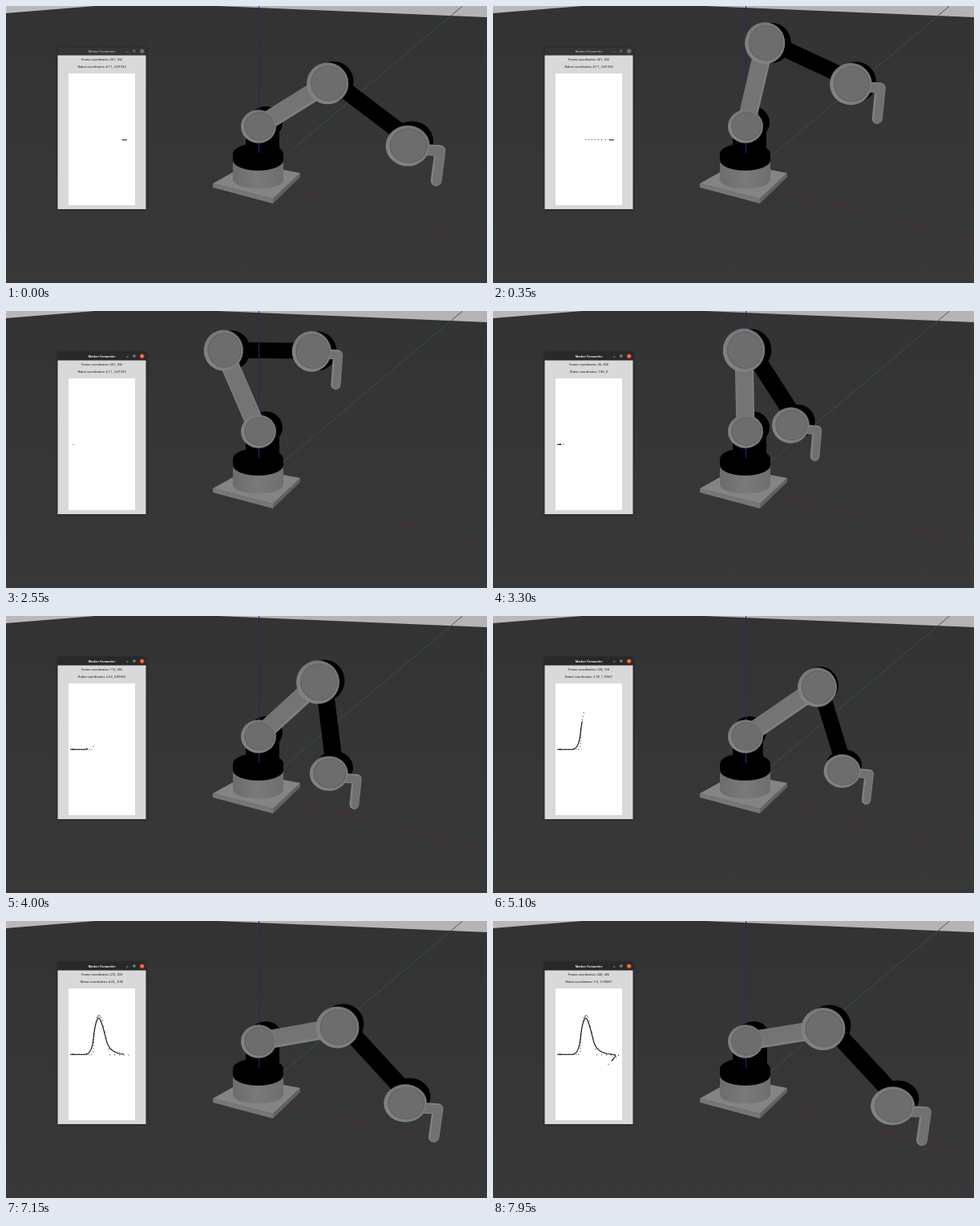
An HTML page with a canvas that plays this animation: 600x345 px, repeating every 8 s.

```html
<!DOCTYPE html>
<html lang="en">
<head>
<meta charset="utf-8">
<title>Robot arm</title>
<style>
html, body { margin: 0; width: 100%; height: 100%; overflow: hidden; background: #373737; }
canvas { display: block; width: 100%; height: 100%; }
</style>
</head>
<body>
<canvas id="stage"></canvas>
<script>
const W = 600, H = 345, LOOP = 8000, STEP = 50;
const SWEEP_END = 1650, FOCUS = 2550, FALL = 1200, LAG = 300;
const SHOULDER = [315, 150];
const canvas = document.getElementById('stage');
const ctx = canvas.getContext('2d');
const ratio = window.devicePixelRatio || 1;
canvas.width = W * ratio;
canvas.height = H * ratio;

// Pointer path in the pad: time, x, y
const CURSOR = [
  [2600, 9, 300], [3200, 25, 300], [3900, 105, 300], [4000, 112, 286],
  [4800, 118, 180], [5100, 128, 134], [5450, 139, 121], [5650, 150, 134],
  [6300, 188, 302], [7250, 288, 303], [7600, 270, 315], [7900, 240, 346]
];
const PAD_START = [244, 301], PAD_REST = [22, 300];

const clamp01 = v => Math.min(Math.max(v, 0), 1);
const mix = (a, b, u) => a + (b - a) * u;
const mixPoint = (p, q, u) => [mix(p[0], q[0], u), mix(p[1], q[1], u)];

function cursorAt(t) {
  const i = Math.max(1, CURSOR.findIndex(k => k[0] >= t));
  const b = t >= CURSOR.at(-1)[0] ? CURSOR.at(-1) : CURSOR[i];
  const a = CURSOR[CURSOR.indexOf(b) - 1];
  return mixPoint(a.slice(1), b.slice(1), clamp01((t - a[0]) / (b[0] - a[0])));
}

// The arm chases the pointer with a short lag
const chase = [PAD_REST];
for (let t = FOCUS + STEP; t <= LOOP; t += STEP) {
  chase.push(mixPoint(chase.at(-1), cursorAt(t), 1 - Math.exp(-STEP / LAG)));
}

const sweepLeft = t => 1 - clamp01(t / SWEEP_END);

function tipAt(t) {
  if (t >= FOCUS) return chase[Math.floor((t - FOCUS) / STEP)];
  return mixPoint(PAD_REST, PAD_START, sweepLeft(t) ** 2.7);
}

function liftAt(t) {
  if (t < FOCUS) return 134 - 82 * sweepLeft(t) ** 5;
  const u = clamp01((t - FOCUS) / FALL);
  return 134 * (1 - u * u * (3 - 2 * u));
}

const toRobot = ([x, y]) => [1.5 + x / 100, (300 - y) / 150];
const toPad = ([x, y]) => [78 + x * 0.275, 84 + y * 0.274];

// Place the wrist from robot coordinates, then solve the elbow
function solveArm(t) {
  const [x, y] = toRobot(tipAt(t)), lift = liftAt(t);
  const wrist = [264.5 + 58.5 * x + 15 * y + lift * 0.12, 152 + 18.8 * x - 11.6 * y - lift];
  const upper = 100 + 10 * (lift / 134) ** 2 + 10 * y;
  const fore = 97 + 7.5 * x - 10 * y;
  const dx = wrist[0] - SHOULDER[0], dy = wrist[1] - SHOULDER[1], d = Math.hypot(dx, dy);
  const bend = Math.acos((upper ** 2 + d ** 2 - fore ** 2) / (2 * upper * d));
  const angle = Math.atan2(dy, dx) - bend;
  const corner = [wrist[0] + 27 + 3.4 * x - 3 * y, wrist[1] + 7 - lift * 0.02 - 4 * y];
  return {
    wrist, corner,
    elbow: [SHOULDER[0] + Math.cos(angle) * upper, SHOULDER[1] + Math.sin(angle) * upper],
    tip: [corner[0] - 1 - x, corner[1] + 27 + 2 * x + lift * 0.05],
    depth: 9 - 5 * y,
    elbowR: 27 - lift * 0.018 - 3 * y,
    wristR: 19.8 + 1.8 * x - 2 * y + lift * 0.012
  };
}

function poly(points, fill) {
  ctx.beginPath();
  points.forEach(p => ctx.lineTo(...p));
  ctx.fillStyle = fill;
  ctx.fill();
}

function line(points, color, width, cap = 'butt') {
  ctx.beginPath();
  points.forEach(p => ctx.lineTo(...p));
  ctx.strokeStyle = color;
  ctx.lineWidth = width;
  ctx.lineCap = cap;
  ctx.lineJoin = 'round';
  ctx.stroke();
}

// Discs look flatter the lower they stand
function disc([x, y], r, fill, squash = 1.08 - y * 0.0009) {
  ctx.beginPath();
  ctx.ellipse(x, y, r, r * squash, 0, 0, Math.PI * 2);
  ctx.fillStyle = fill;
  ctx.fill();
}

function box(x, y, w, h, fill) {
  ctx.fillStyle = fill;
  ctx.fillRect(x, y, w, h);
}

function shade(x0, y0, x1, y1, ...colors) {
  const g = ctx.createLinearGradient(x0, y0, x1, y1);
  colors.forEach((c, i) => g.addColorStop(i / (colors.length - 1), c));
  return g;
}

function text(str, y, size, color, weight = 400) {
  ctx.font = `${weight} ${size}px "Noto Sans", sans-serif`;
  ctx.textAlign = 'center';
  ctx.fillStyle = color;
  ctx.fillText(str, 119.5, y);
}

function cylinder(x, top, bottom, rx, ry, fill) {
  ctx.beginPath();
  ctx.ellipse(x, top, rx, ry, 0, Math.PI, 0);
  ctx.ellipse(x, bottom, rx, ry, 0, 0, Math.PI);
  ctx.fillStyle = fill;
  ctx.fill();
}

function drawWorld() {
  box(0, 0, W, H, shade(0, 0, 0, H, '#333', '#363636', '#383838'));
  poly([[0, 0], [111, 0], [0, 9]], '#b9b9b9');
  poly([[264, 0], [W, 0], [W, 14]], '#b4b4b4');
  line([[569.5, 0], [340, 193]], '#2b602b', 0.9);
  line([[340, 225], [W, 291.5]], '#5c2727', 0.8);
}

function drawBase() {
  poly([[258, 221], [333, 240], [333, 246], [258, 226]], '#777');
  poly([[333, 240], [367, 208], [367, 213], [333, 246]], '#626262');
  poly([[258, 221], [303, 196], [367, 208], [333, 240]], '#848484');
  cylinder(314.5, 192, 216, 31.5, 11.5, shade(283, 0, 346, 0, '#6c6c6c', '#7a7a7a', '#6e6e6e'));
  cylinder(314.5, 184, 192, 31.5, 13, '#000');
}

function joint([x, y], r) {
  disc([x, y], r, shade(x - r, y + r, x + r, y - r, '#868686', '#7a7a7a', '#747474'));
  disc([x + 1, y], r * 0.85, '#616161');
  disc([x + 1.2, y], r * 0.81, '#6d6d6d');
}

function drawArm(t) {
  const { elbow, wrist, corner, tip, depth, elbowR, wristR } = solveArm(t);
  const behind = ([x, y]) => [x + depth - (x - 315) * 0.02, y - (y - 40) / 22];
  const [backShoulder, backElbow, backWrist] = [SHOULDER, elbow, wrist].map(behind);

  box(299, 150, backShoulder[0] - 282, 34, '#000');
  disc(backShoulder, 21, '#000');
  disc(backElbow, elbowR - 1, '#000');
  line([backElbow, backWrist], '#000', elbowR * 0.8);
  disc(backWrist, wristR - 1, '#000');
  line([[315.5, 0], [315.5, 183]], '#24247a', 1);

  const tool = [[wrist[0] + 14, corner[1] - 1.5], corner, tip];
  line(tool, '#818181', wristR * 0.5, 'round');
  line(tool.map(([x, y]) => [x + 0.8, y + 0.6]), '#717171', wristR * 0.5 - 3, 'round');
  line([SHOULDER, elbow], '#7f7f7f', 23);
  line([SHOULDER, elbow].map(([x, y]) => [x - 0.5, y - 1.5]), '#747474', 20);
  joint(SHOULDER, 22);
  joint(elbow, elbowR);
  joint(wrist, wristR);
}

const dot = ([x, y]) => box(x - 0.5, y - 0.5, 1, 1, '#222');

function drawTrail(t) {
  if (t < FOCUS) {
    line([[145, 166.8], [151, 166.8]], '#222', 1.1);
    for (let s = 0; s <= Math.min(t, SWEEP_END); s += STEP) dot(toPad(tipAt(s)));
    return;
  }
  dot(toPad(PAD_REST));
  const path = chase.slice(1, (t - FOCUS) / STEP + 1);
  line(path.map(toPad), '#111', 1.15, 'round');
  for (let s = FOCUS + STEP; s <= t; s += s < 6300 ? 100 : 200) dot(toPad(cursorAt(s)));
}

function drawWindow(t) {
  const focused = t >= FOCUS;
  const point = t <= FOCUS ? [261, 302] : cursorAt(Math.floor(t / 100) * 100).map(Math.round);
  const robot = toRobot(point).map(v => +v.toFixed(5));
  const ink = focused ? '#f4f4f4' : '#a3a3a0';
  ctx.save();
  ctx.shadowColor = 'rgba(0,0,0,.45)';
  ctx.shadowBlur = 4 * ratio;
  ctx.beginPath();
  ctx.roundRect(64.5, 51.5, 110, 201.5, [2, 2, 0, 0]);
  ctx.fillStyle = focused ? '#292929' : '#353535';
  ctx.fill();
  ctx.restore();
  box(64.5, 61.5, 110, 191.5, '#d9d9d9');
  text('Marker Forwarder', 57.7, 3.7, ink, 700);
  line([[150, 57], [152.5, 57]], ink, 0.5);
  ctx.strokeRect(158.8, 54.9, 2.2, 2.2);
  disc([169.7, 56.2], 2.7, focused ? '#e95420' : '#696969', 1);
  line([[168.8, 55.3], [170.6, 57.1]], ink, 0.5);
  line([[170.6, 55.3], [168.8, 57.1]], ink, 0.5);
  text(`Frame coordinates: ${point.join(', ')}`, 68.3, 3.85, '#111');
  text(`Robot coordinates: ${robot.join(', ')}`, 76.7, 3.85, '#111');
  box(78, 84, 83, 164, '#fff');
  drawTrail(t);
}

function frame(now) {
  const t = Math.floor((now % LOOP) / STEP) * STEP;
  ctx.setTransform(ratio, 0, 0, ratio, 0, 0);
  drawWorld();
  drawBase();
  drawArm(t);
  drawWindow(t);
  requestAnimationFrame(frame);
}
frame(performance.now());
</script>
</body>
</html>
```
